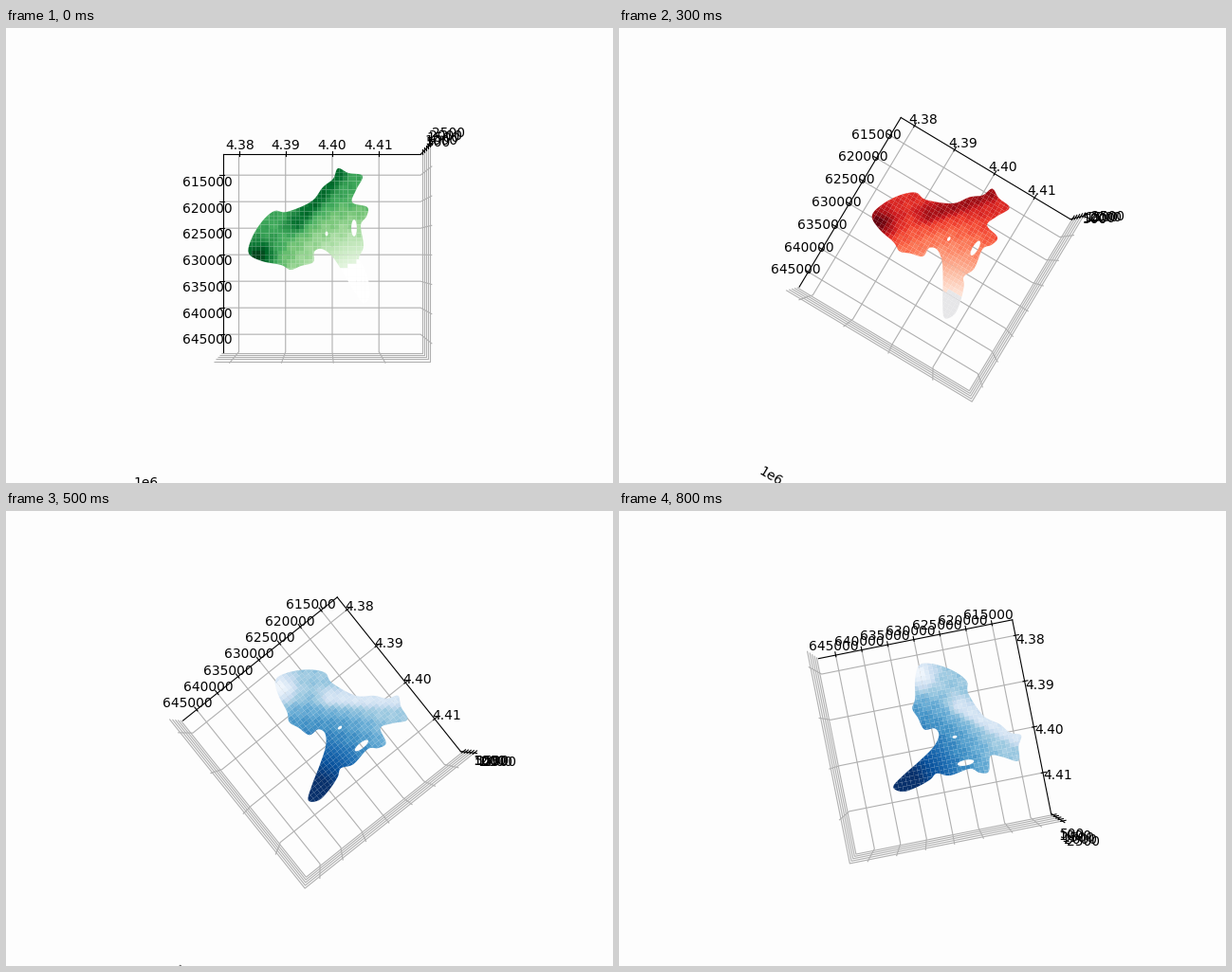
Recreate the animation shown at these times as a matplotlib script. Size 640 by 480 pixels, loop 900 ms.

```python
import numpy as np
import matplotlib.pyplot as plt
from matplotlib.animation import FuncAnimation
from matplotlib.collections import PolyCollection
from matplotlib.path import Path

BG = "#fdfdfd"
CENTER = np.array([333.0, 237.4])   # pivot on the stage, y down
TINTS = "GGGRGBBBB"                 # one colour ramp per step
CELL = 4.6

# Key points of the coast at turn 0, clockwise from the northern tip.
COAST = [(350, 148), (361, 153), (376, 156), (369, 171), (365, 184), (381, 189),
         (380, 199), (374, 208), (377, 230), (372, 243), (377, 251), (382, 266),
         (384, 282), (377, 291), (367, 278), (356, 259), (344, 241), (333, 233),
         (325, 236), (324, 247), (311, 251), (300, 255), (290, 250), (270, 246),
         (256, 238), (259, 222), (270, 204), (283, 193), (296, 194), (322, 183),
         (334, 168), (345, 159)]


def turn_at(i):
    """Angle of a viewpoint walking along two sides of a square."""
    k = i + (i > 3)
    return np.degrees(np.arctan2(min(k, 5), min(5, 10 - k)))


def rotate(p, deg):
    c, s = np.cos(np.radians(deg)), np.sin(np.radians(deg))
    return (np.asarray(p) - CENTER) @ np.array([[c, s], [-s, c]]) + CENTER


def smooth(points, n=5):
    """Closed Catmull-Rom curve through the points."""
    p1 = np.array(points, float)[:, None]
    p0, p2, p3 = (np.roll(p1, k, axis=0) for k in (1, -1, -2))
    t = (np.arange(n) / n)[None, :, None]
    curve = (2 * p1 + (p2 - p0) * t + (2 * p0 - 5 * p1 + 4 * p2 - p3) * t ** 2
             + (3 * p1 - p0 - 3 * p2 + p3) * t ** 3) / 2
    return curve.reshape(-1, 2)


def hole(x, y, rx, ry):
    """Ellipse wound against the coast."""
    a = -np.linspace(0, 2 * np.pi, 16, endpoint=False)
    return np.column_stack([x + rx * np.cos(a), y + ry * np.sin(a)])


def ring(p):
    codes = [Path.MOVETO] + [Path.LINETO] * (len(p) - 1) + [Path.CLOSEPOLY]
    return Path(np.vstack([p, p[:1]]), codes)


def height(p):
    """Slope rising from the tail, a peak in the west and a northern ridge."""
    def bump(d, width):
        return np.exp(-(d / width) ** 2 / 2)

    rise = .64 * np.clip((np.hypot(*(p - (380, 289)).T) - 25) / 90, 0, 1)
    peak = .38 * bump(np.hypot(*(p - (266, 240)).T), 11)
    start, along = np.array([306, 207]), np.array([45, -55])
    t = np.clip((p - start) @ along / (along @ along), 0, 1)
    ridge = .25 * bump(np.hypot(*(p - start - t[:, None] * along).T), 7)
    ripple = .04 * np.sin(p[:, 0] * .35) * np.cos(p[:, 1] * .3) * (rise > .3)
    return np.clip(rise + peak + ridge + ripple, 0, 1)


def ramps(h):
    green = plt.cm.Greens(h)
    green[h < .13] = 1
    red = plt.cm.Reds(.1 + .9 * h)
    red[h < .02] = (.9, .9, .91, 1)
    return {"G": green, "R": red, "B": plt.cm.Blues(1 - .95 * h)}


fig = plt.figure(figsize=(6.4, 4.8), dpi=100, facecolor=BG)

# Box with its grid and tick labels, in units of -1..1.
box = fig.add_subplot(projection="3d")
box.set_facecolor(BG)
box.set_box_aspect((1, 1, 1))
box.set(xlim=(-1, 1), ylim=(-1, 1), zlim=(-1, 1))
box.set_xticks([-.789 + .2687 * i for i in range(7)],
               [str(615000 + 5000 * i) for i in range(7)])
box.set_yticks([-.8397 + .4726 * i for i in range(4)],
               [f"{4.38 + .01 * i:.2f}" for i in range(4)])
box.set_zticks([-.684 + .345 * i for i in range(5)],
               [str(500 + 500 * i) for i in range(5)])
for axis in (box.xaxis, box.yaxis, box.zaxis):
    axis.set_pane_color((1, 1, 1, 0))

# Flat layer in stage pixels: seen from straight above, the terrain only turns.
flat = fig.add_axes([0, 0, 1, 1])
flat.set(xlim=(0, 640), ylim=(480, 0))
flat.axis("off")

gx, gy = np.meshgrid(np.arange(250, 390, CELL), np.arange(143, 296, CELL))
square = np.array([(0, 0), (1, 0), (1, 1), (0, 1)]) * CELL
cells = np.column_stack([gx.ravel(), gy.ravel()])[:, None] + square
colors = ramps(height(cells.mean(axis=1)))
edges = [smooth(COAST), hole(367, 211, 3, 9), hole(338, 217, 1.5, 2.5)]

land = PolyCollection(cells, edgecolors="none", antialiaseds=True, snap=False)
flat.add_collection(land, autolim=False)
exponent = flat.text(0, 0, "1e6", va="baseline", rotation_mode="anchor")


def update(i):
    turn = turn_at(i)
    # A hair off the vertical keeps the same two walls in view all the time.
    box.view_init(elev=90 - 1e-4, azim=turn + 180 + 1e-5, roll=180)
    land.set_verts(rotate(cells, turn))
    land.set_facecolor(colors[TINTS[i]])
    outline = Path.make_compound_path(*[ring(rotate(e, turn)) for e in edges])
    land.set_clip_path(outline, flat.transData)
    exponent.set_position((160.5 + 17 * np.sin(np.radians(turn)), 484))
    exponent.set_ha("right" if turn < 44 else "left")
    exponent.set_rotation(-turn)
    return land, exponent


anim = FuncAnimation(fig, update, frames=len(TINTS), interval=100, repeat=True,
                     repeat_delay=0, init_func=lambda: update(0))
plt.show()
```
